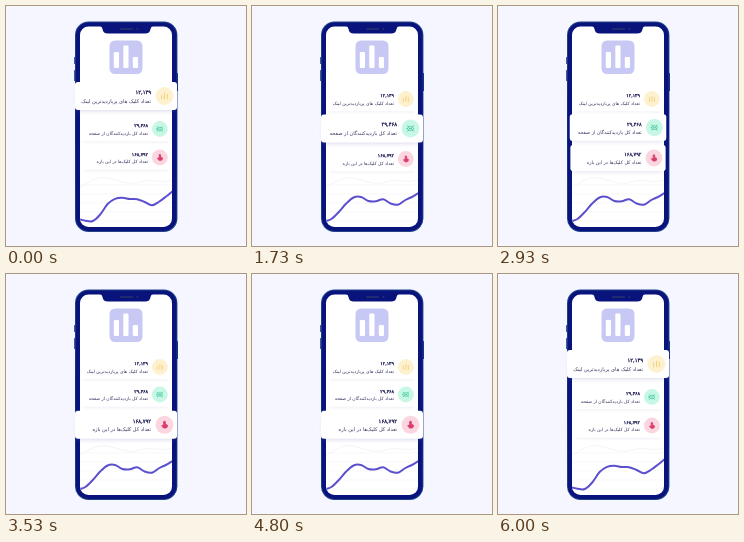
Recreate the animation shown at these times as an HTML page. Size 240x240 px, loop 6.07 s.

```html
<!DOCTYPE html>
<html lang="fa">
<head>
<meta charset="utf-8">
<style>
  html, body { margin: 0; width: 100%; height: 100%; overflow: hidden; background: #f5f6ff; }
  svg { display: block; width: 100vw; height: 100vh; }
  text { font-family: "DejaVu Sans", sans-serif; direction: rtl; text-anchor: start; fill: #17154f; }
  .num { font-size: 5.2px; stroke: #17154f; stroke-width: .3px; }
  .label { font-size: 5.1px; fill: #34325f; }
</style>
</head>
<body>
<svg viewBox="0 0 240 240">
  <defs>
    <clipPath id="screen"><rect x="74" y="20.5" width="92" height="200.5" rx="8.5"/></clipPath>
    <filter id="soft" x="-20%" y="-40%" width="140%" height="200%"><feGaussianBlur stdDeviation="2"/></filter>
    <linearGradient id="rim" x2="0" y2="1">
      <stop stop-color="#24448a"/><stop offset=".5" stop-color="#10277f"/><stop offset="1" stop-color="#24448a"/>
    </linearGradient>
  </defs>
  <g fill="#183080">
    <rect x="68.2" y="51" width="2" height="7" rx=".6"/>
    <rect x="68.2" y="64" width="2" height="11" rx=".6"/>
    <rect x="170" y="67" width="2" height="18" rx=".6"/>
  </g>
  <rect x="69" y="15.5" width="102.4" height="210.5" rx="13.5" fill="url(#rim)"/>
  <rect x="70" y="16.5" width="100.4" height="208.5" rx="12.5" fill="#08147c"/>
  <rect x="74" y="20.5" width="92" height="200.5" rx="8.5" fill="#fff"/>
  <path d="M94 20H147Q145 20.5 144.5 23Q144 27.5 139 27.5H102Q97 27.5 96.5 23Q96 20.5 94 20Z" fill="#08147c"/>
  <rect x="114" y="22.3" width="13" height="1.4" rx=".7" fill="#263568"/>
  <circle cx="131.5" cy="23" r="1" fill="#263568"/>
  <rect x="103.5" y="34.5" width="33" height="33.5" rx="5.5" fill="#c8c8f5"/>
  <g fill="#fff">
    <rect x="107.8" y="46" width="5.2" height="16" rx="1.2"/>
    <rect x="117.3" y="39.5" width="5.2" height="22.5" rx="1.2"/>
    <rect x="126.8" y="51" width="5.2" height="11" rx="1.2"/>
  </g>
  <g clip-path="url(#screen)" fill="none">
    <path d="M74 179H166M74 188H166M74 197H166M74 206H166M74 215H166" stroke="#f3f3f7" stroke-width=".6"/>
    <path d="M74 181C84 176 90 170 101 172S122 180 134 176S154 178 166 174" stroke="#f0f0f5" stroke-width=".7"/>
    <path id="line" stroke="#5b50cd" stroke-width="2" stroke-linecap="round"/>
  </g>
  <g id="cards"></g>
</svg>
<script>
const LOOP = 6070;
const SHRINK = 0.88;
const CARDS = [
  { num: "۱۲,۱۳۹", label: "تعداد کلیک های پربازدیدترین لینک", tint: "#fdf1cf", ink: "#f0cf72",
    glyph: "M-2.8 2.8V-1M0 2.8V-2.8M2.8 2.8V-1.8" },
  { num: "۲۹,۴۶۸", label: "تعداد کل بازدیدکنندگان از صفحه", tint: "#c8f7e6", ink: "#43c79d",
    glyph: "M-3.4 0Q0 -4 3.4 0Q0 4 -3.4 0ZM-1 0H1M-3 -2.5L-2 -2M3 -2.5L2 -2M-3 2.5L-2 2M3 2.5L2 2" },
  { num: "۱۶۸,۷۹۲", label: "تعداد کل کلیک&zwnj;ها در این بازه", tint: "#fbd6e0", ink: "#d93d6b",
    glyph: "M-.8 1V-3.2Q0 -4 .8 -3.2V-.5L2.8 .2V2L1.8 3.2H-1L-2.8 .8Q-2 0 -.8 1Z", solid: true }
];
// Card centres for each active card
const ROWS = [[90, 123, 151.5], [93, 122.5, 153], [93, 120.5, 150.8]];
const SWITCHES = [870, 2810, 4800];
const SWITCH_TIME = 260;
const LEFT = 72, STEP = 7.4;
const WAVE_A = [213, 214.8, 215, 208.5, 198, 192.8, 191.8, 193, 193.2, 196, 199.3, 195.5, 190, 184.5];
const WAVE_B = [215.5, 213, 206, 197.5, 191.5, 191, 195, 195.3, 193.3, 197.5, 198.7, 194, 190.5, 186.5];

const clamp = v => Math.min(1, Math.max(0, v));
const ease = v => { v = clamp(v); return v * v * (3 - 2 * v); };
const mix = (a, b, k) => a + (b - a) * k;

const holder = document.getElementById("cards");
const line = document.getElementById("line");
holder.innerHTML = CARDS.map(c => `
  <g>
    <rect x="-49" y="-10" width="98" height="25" rx="3" fill="#7778b8" filter="url(#soft)"/>
    <rect x="-51" y="-14" width="102" height="28" rx="3" fill="#fff"/>
    <text class="num" x="25" y="-2.2">${c.num}</text>
    <text class="label" x="25" y="6.7">${c.label}</text>
    <circle cx="38.5" r="9" fill="${c.tint}"/>
    <path transform="translate(38.5 0)" d="${c.glyph}" fill="${c.solid ? c.ink : "none"}"
      stroke="${c.ink}" stroke-width=".9" stroke-linecap="round"/>
  </g>`).join("");
const groups = [...holder.children];

function smoothPath(ys) {
  const last = ys.length - 1;
  let d = `M${LEFT} ${ys[0]}`;
  for (let i = 0; i < last; i++) {
    const x = LEFT + i * STEP;
    const y1 = ys[i] + (ys[i + 1] - ys[Math.max(0, i - 1)]) / 6;
    const y2 = ys[i + 1] - (ys[Math.min(last, i + 2)] - ys[i]) / 6;
    d += `C${x + STEP / 3} ${y1} ${x + STEP * 2 / 3} ${y2} ${x + STEP} ${ys[i + 1]}`;
  }
  return d;
}

function draw(t) {
  const k = SWITCHES.map(s => ease((t - s) / SWITCH_TIME));
  const weights = [1 - k[0] + k[2], k[0] - k[1], k[1] - k[2]];
  groups.forEach((g, i) => {
    const y = ROWS.reduce((sum, row, j) => sum + row[i] * weights[j], 0);
    const size = mix(SHRINK, 1, weights[i]);
    g.setAttribute("transform", `translate(120 ${y}) scale(${size})`);
    g.firstElementChild.setAttribute("opacity", mix(0.12, 0.28, weights[i]));
  });
  // Keep the enlarged card in front
  const top = groups[weights.indexOf(Math.max(...weights))];
  if (holder.lastElementChild !== top) holder.append(top);

  const bend = ease(t / 800) - ease((t - 5250) / 750);
  line.setAttribute("d", smoothPath(WAVE_A.map((y, i) => mix(y, WAVE_B[i], bend))));
}

const start = performance.now();
function tick() {
  draw((performance.now() - start) % LOOP);
  requestAnimationFrame(tick);
}
draw(0);
requestAnimationFrame(tick);
</script>
</body>
</html>
```
